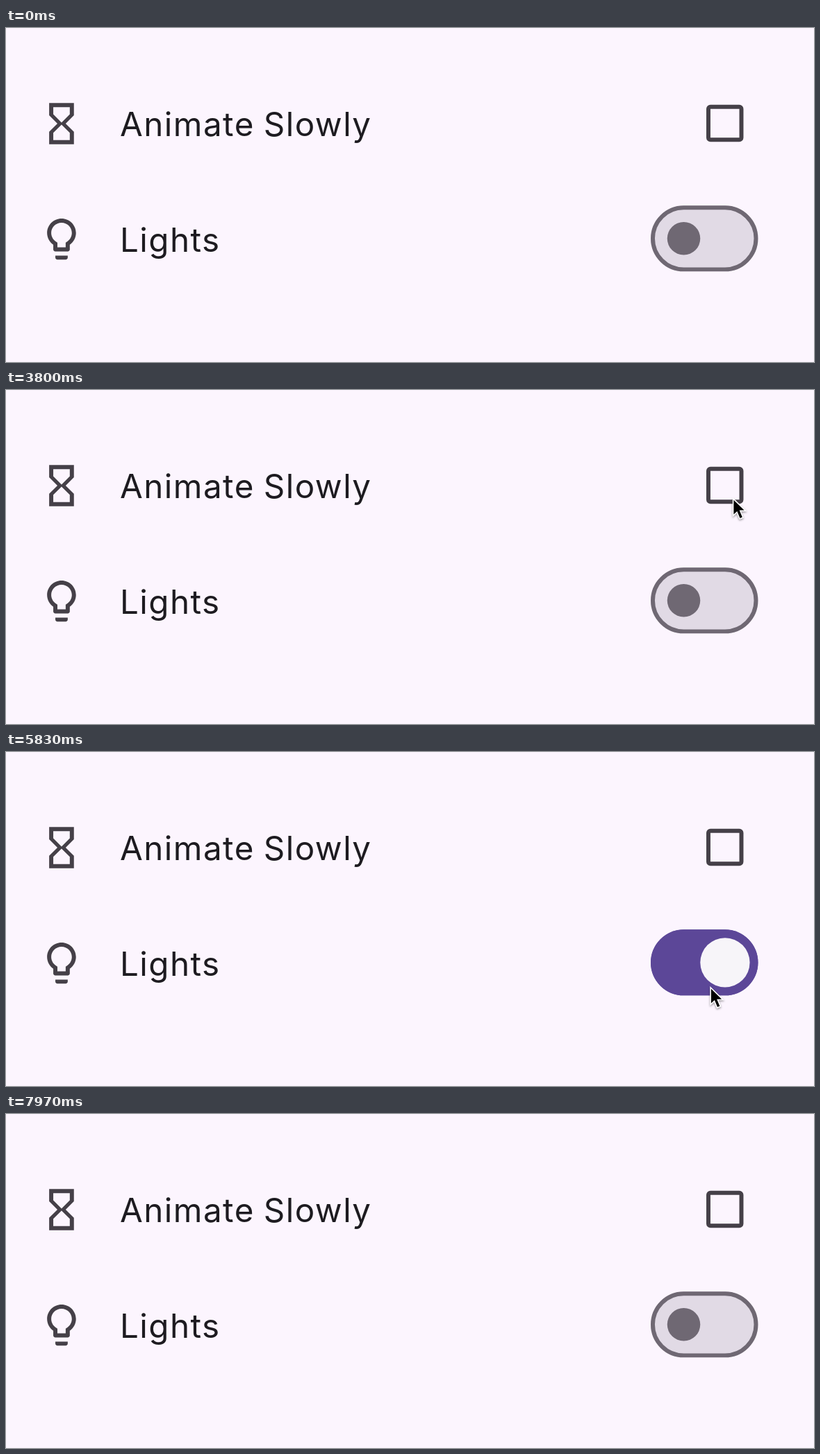
Write an HTML page with a canvas that moves like this. It is 1163 px wide and 482 px high and loops after 8.21 s.

```html
<!DOCTYPE html>
<html lang="en">
<head>
<meta charset="utf-8">
<title>Animate Slowly</title>
<style>
html, body { margin: 0; width: 100%; height: 100%; overflow: hidden; background: #fcf5fe; }
canvas { display: block; }
</style>
</head>
<body>
<canvas id="stage" width="1163" height="482"></canvas>
<script>
const ctx = document.getElementById('stage').getContext('2d');
const LOOP = 8210;
const DP = 2.97; // stage pixels per layout unit

const BG = [252, 245, 254], INK = [69, 64, 72], PURPLE = [92, 71, 152];
const TRACK = [225, 218, 229], OUTLINE = [111, 104, 115];
const WHITE = [247, 245, 249], LILAC = [230, 214, 253];

const HOURGLASS = new Path2D('M6 2v6h.01L6 8.01 10 12l-4 4 .01.01H6V22h12v-5.99h-.01L18 16l-4-4 4-3.99-.01-.01H18V2H6z' +
  'm10 14.5V20H8v-3.5l4-4 4 4zm-4-5l-4-4V4h8v3.5l-4 4z');
const BULB = new Path2D('M9 21c0 .55.45 1 1 1h4c.55 0 1-.45 1-1v-1H9v1z' +
  'm3-19C8.14 2 5 5.14 5 9c0 2.38 1.19 4.47 3 5.74V17c0 .55.45 1 1 1h6c.55 0 1-.45 1-1v-2.26c1.81-1.27 3-3.36 3-5.74 0-3.86-3.14-7-7-7z' +
  'm2.85 11.1l-.85.6V16h-4v-2.3l-.85-.6C7.8 12.16 7 10.63 7 9c0-2.76 2.24-5 5-5s5 2.24 5 5c0 1.63-.8 3.16-2.15 4.1z');
const ARROW = new Path2D('M1.2 3V22.5L5.8 18.2 9.7 27.6 12.8 26.3 8.9 17H15.4Z');

// Pointer waypoints: time, x, y
const POINTER = [
  [560, 1166, 157], [740, 1085, 146], [970, 1039, 138], [2160, 1039, 138],
  [2330, 1051, 157], [2600, 1052, 157], [3000, 1046, 155], [3790, 1046, 155],
  [4000, 1059, 245], [4220, 1036, 395], [4430, 998, 348], [4600, 976, 305],
  [4700, 975, 304], [5300, 975, 304], [5650, 1000, 340], [6050, 1024, 335],
  [6500, 1025, 326], [6670, 1025, 326], [6900, 1023, 327], [7120, 1023, 327],
  [7280, 1035, 372], [7400, 1056, 490]
];

const CHECK = { on: 1385, off: 3030, span: 400 };
const SWITCH = { on: 4920, off: 6990, span: 300 };
const PRESS = 6900, RELEASE = 6985;

const clamp = v => Math.min(1, Math.max(0, v));
const phase = (t, start, span) => clamp((t - start) / span);
const mix = (a, b, k) => a + (b - a) * k;
const blend = (a, b, k) => a.map((v, i) => mix(v, b[i], k));
const rgb = (c, alpha = 1) => `rgba(${c.map(Math.round).join()},${alpha})`;
const smooth = k => k * k * (3 - 2 * k);
const outBack = k => 1 + 2.7 * (k - 1) ** 3 + 1.7 * (k - 1) ** 2;

function fillRound(x, y, w, h, r, color) {
  ctx.fillStyle = color;
  ctx.beginPath();
  ctx.roundRect(x, y, w, h, r);
  ctx.fill();
}

function strokeInside(x, y, w, h, r, width, color) {
  const half = width / 2;
  ctx.strokeStyle = color;
  ctx.lineWidth = width;
  ctx.beginPath();
  ctx.roundRect(x + half, y + half, w - width, h - width, Math.max(0, r - half));
  ctx.stroke();
}

function icon(path, x, y) {
  ctx.save();
  ctx.translate(x, y);
  ctx.scale(DP, DP);
  ctx.fillStyle = rgb(INK);
  ctx.fill(path);
  ctx.restore();
}

function label(text, baseline) {
  ctx.font = `400 ${16 * DP}px Inter, Roboto, sans-serif`;
  ctx.letterSpacing = `${0.5 * DP}px`;
  ctx.wordSpacing = '-2px';
  ctx.fillStyle = '#1d1b20';
  ctx.fillText(text, 164, baseline);
}

function rowInk(t) {
  if (t < PRESS || t > 7400) return;
  const top = 221, height = 166;
  const glow = smooth(phase(t, PRESS, 75)) * (1 - phase(t, RELEASE + 15, 200));
  ctx.save();
  ctx.beginPath();
  ctx.rect(0, top, 1163, height);
  ctx.clip();
  ctx.fillStyle = rgb(INK, 0.016 * glow);
  ctx.fillRect(0, top, 1163, height);
  const grow = smooth(phase(t, RELEASE, 225));
  const alpha = phase(t, PRESS, 60) * (1 - phase(t, RELEASE + 170, 200));
  ctx.fillStyle = rgb(INK, 0.032 * alpha);
  ctx.beginPath();
  ctx.arc(mix(1023, 581, grow), mix(328, 304, grow), mix(178 + 6 * phase(t, PRESS, 70), 600, grow), 0, 7);
  ctx.fill();
  ctx.restore();
}

function checkbox(t) {
  const k = t < CHECK.off
    ? phase(t, CHECK.on, CHECK.span) ** 1.7
    : 1 - phase(t, CHECK.off, CHECK.span) ** 1.7;
  const x = 1008, y = 110.8, edge = 18 * DP;
  const inset = (1 - Math.abs(k - 0.5) * 2) * DP;
  const size = edge - 2 * inset, tint = clamp(k * 4);
  const box = [x + inset, y + inset, size, size, 2 * DP];
  if (k > 0) fillRound(...box, rgb(PURPLE, tint));
  if (k <= 0.5) strokeInside(...box, 2 * DP, rgb(blend(INK, PURPLE, tint)));
  if (k <= 0.5) return;

  const draw = (k - 0.5) * 2;
  const at = (px, py) => [x + px * edge, y + py * edge];
  const first = clamp(draw * 2), second = clamp(draw * 2 - 1);
  ctx.beginPath();
  ctx.moveTo(...at(0.15, 0.45));
  ctx.lineTo(...at(mix(0.15, 0.4, first), mix(0.45, 0.7, first)));
  if (second) ctx.lineTo(...at(mix(0.4, 0.85, second), mix(0.7, 0.25, second)));
  ctx.strokeStyle = rgb(WHITE);
  ctx.lineWidth = 2 * DP;
  ctx.lineJoin = 'miter';
  ctx.stroke();
}

function toggle(t) {
  const closing = t >= SWITCH.off;
  const u = phase(t, closing ? SWITCH.off : SWITCH.on, SWITCH.span);
  const pos = closing ? 1 - outBack(u) : outBack(u);
  const k = clamp(pos);
  const x = 928, y = 256.3, w = 52 * DP, h = 32 * DP;
  fillRound(x, y, w, h, h / 2, rgb(blend(TRACK, PURPLE, k)));
  strokeInside(x, y, w, h, h / 2, 2 * DP, rgb(blend(OUTLINE, PURPLE, k)));

  // The thumb stretches to a 34 by 22 pill before settling.
  const from = closing ? 24 : 16, to = closing ? 16 : 24;
  const stretch = smooth(clamp(u / 0.11));
  const settle = 1 - (1 - clamp((u - 0.11) / 0.72)) ** 4;
  const tw = mix(mix(from, 34, stretch), to, settle) * DP;
  const th = mix(mix(from, 22, stretch), to, settle) * DP;
  const cx = x + mix(16, 36, pos) * DP, cy = y + h / 2;
  const active = blend(WHITE, LILAC, phase(t, PRESS, 40));
  fillRound(cx - tw / 2, cy - th / 2, tw, th, Math.min(tw, th) / 2, rgb(blend(OUTLINE, active, k)));
}

// Monotone cubic through the waypoints, one axis at a time.
function along(t, axis) {
  const i = Math.max(1, POINTER.findIndex(p => t <= p[0])) - 1;
  const slope = n => (POINTER[n + 1][axis] - POINTER[n][axis]) / (POINTER[n + 1][0] - POINTER[n][0]);
  const tangent = n => {
    if (n === 0) return slope(0);
    if (n === POINTER.length - 1) return slope(n - 1);
    const a = slope(n - 1), b = slope(n);
    return a * b <= 0 ? 0 : 2 * a * b / (a + b);
  };
  const a = POINTER[i], b = POINTER[i + 1];
  const span = b[0] - a[0], k = (t - a[0]) / span;
  return mix(a[axis], b[axis], smooth(k)) +
    span * k * (1 - k) * ((1 - k) * tangent(i) - k * tangent(i + 1));
}

function pointer(t) {
  if (t < POINTER[0][0] || t > POINTER[POINTER.length - 1][0]) return;
  ctx.save();
  ctx.translate(along(t, 1), along(t, 2));
  ctx.scale(1.07, 1.07);
  ctx.save();
  ctx.shadowColor = 'rgba(0,0,0,0.4)';
  ctx.shadowBlur = 3;
  ctx.shadowOffsetY = 1.5;
  ctx.strokeStyle = '#fff';
  ctx.lineWidth = 3;
  ctx.lineJoin = 'miter';
  ctx.stroke(ARROW);
  ctx.restore();
  ctx.fillStyle = '#000';
  ctx.fill(ARROW);
  ctx.restore();
}

function frame(now) {
  const t = now % LOOP;
  ctx.fillStyle = rgb(BG);
  ctx.fillRect(0, 0, 1163, 482);
  rowInk(t);
  icon(HOURGLASS, 44.3, 102.3);
  icon(BULB, 44.3, 269);
  label('Animate Slowly', 156);
  label('Lights', 323);
  checkbox(t);
  toggle(t);
  pointer(t);
  requestAnimationFrame(time => frame(Math.max(0, time - start)));
}

const start = performance.now();
frame(0);
</script>
</body>
</html>
```
